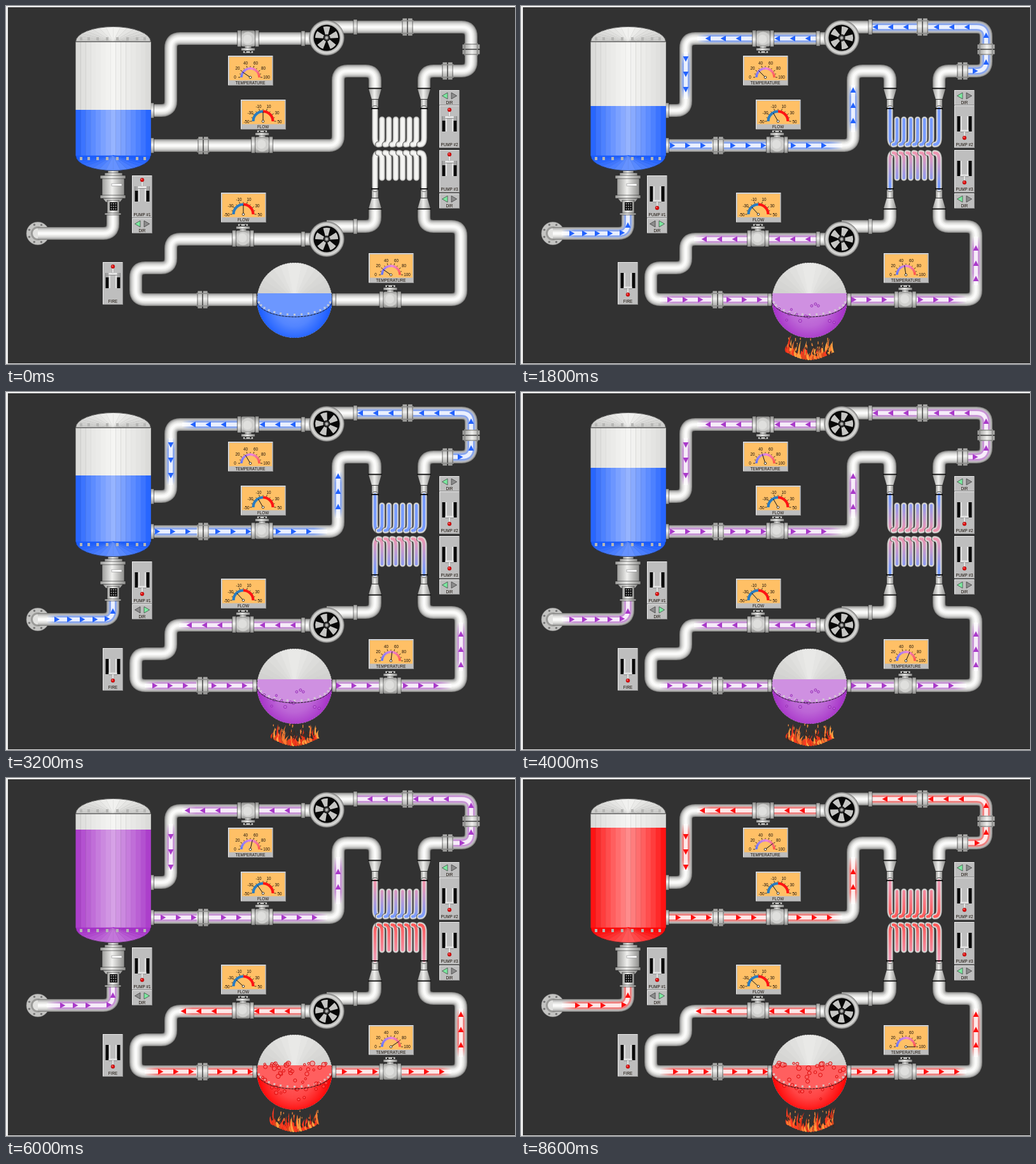
Animation, 800 px wide and 562 px high, one loop 8.8 s. Source, as an HTML page:

```html
<!DOCTYPE html>
<html lang="en">
<head>
<meta charset="utf-8">
<title>Heating loop</title>
<style>
html, body { margin: 0; width: 100%; height: 100%; overflow: hidden; background: #323232; }
svg { display: block; width: 100%; height: 100%; }
text { font: 6.3px "Liberation Sans", Arial, sans-serif; text-anchor: middle; fill: #181008; }
</style>
</head>
<body>
<svg id="stage" viewBox="0 0 800 562"></svg>
<script>
const LOOP = 8800, STEP = 200;
const BLUE = '#1a5cff', PURPLE = '#a632c8', RED = '#ff0505', PINK = '#ee7f9f';

// ---------- helpers ----------
const rgb = h => [1, 3, 5].map(i => parseInt(h.substr(i, 2), 16));
const mix = (a, b, k) => {
  const p = rgb(a), q = rgb(b);
  return '#' + p.map((v, i) => Math.round(v + (q[i] - v) * k).toString(16).padStart(2, '0')).join('');
};
const pale = (c, k) => mix(c, '#ffffff', k);
const times = (n, f) => Array.from({ length: n }, (_, i) => f(i)).join('');
const rect = (x, y, w, h, fill, more = '') =>
  `<rect x="${x}" y="${y}" width="${w}" height="${h}" fill="${fill}" ${more}/>`;
const disc = (x, y, r, fill, more = '') => `<circle cx="${x}" cy="${y}" r="${r}" fill="${fill}" ${more}/>`;
const line = (d, c, w, more = '') => `<path d="${d}" fill="none" stroke="${c}" stroke-width="${w}" ${more}/>`;
const shape = (d, fill, more = '') => `<path d="${d}" fill="${fill}" ${more}/>`;
const label = (x, y, s) => `<text x="${x}" y="${y}">${s}</text>`;
const EDGE = 'stroke="#222" stroke-width=".6"';
const FLIP = 'transform="translate(0 448) scale(1 -1)"';

function random(seed) {
  let s = seed * 7919 + 17;
  return () => (s = (s * 16807) % 2147483647) / 2147483647;
}
function track(keys, t) {
  let i = 1;
  while (i < keys.length - 1 && t > keys[i][0]) i++;
  const [a, u] = keys[i - 1], [b, v] = keys[i];
  return u + (v - u) * Math.max(0, Math.min(1, (t - a) / (b - a)));
}

// ---------- pipework ----------
// starts at (x, y), then runs alternately sideways and upright through the given stops
function route(x, y, ...stops) {
  const R = 15;
  let d = `M${x} ${y}`;
  stops.forEach((v, i) => {
    const flat = i % 2 === 0, from = flat ? x : y, dir = Math.sign(v - from);
    const next = stops[i + 1];
    if (next === undefined) {
      d += (flat ? 'H' : 'V') + v;
    } else {
      const turn = Math.sign(next - (flat ? y : x));
      const [cx, cy] = flat ? [v, y] : [x, v];
      d += (flat ? 'H' : 'V') + (v - dir * R) + `Q${cx} ${cy} ` +
        (flat ? `${cx} ${cy + turn * R}` : `${cx + turn * R} ${cy}`);
    }
    if (flat) x = v; else y = v;
  });
  return d;
}

const SHADES = [[1, '#858583'], [.9, '#a2a2a0'], [.8, '#bababa'], [.68, '#cececc'],
  [.54, '#e0e0de'], [.38, '#eeeeec'], [.2, '#fafaf9']];
const pipe = d => SHADES.map(([k, c]) => line(d, c, k * 20)).join('');

const PIPES = [
  route(50, 357, 168, 326),
  route(230, 164, 259, 51, 480),
  route(230, 219, 522, 102, 580, 130),
  route(504, 33, 731, 102, 657, 130),
  route(504, 366, 259, 411, 204, 461, 392),
  route(504, 346, 580, 318),
  route(515, 461, 715, 346, 657, 318)
];

// x1, y1, x2, y2, first arrow, fade (1 start, 2 end), gap, count
const UPPER = {
  runs: [
    [232, 219, 300, 219, 6, 0], [319, 219, 386, 219, 14, 0], [420, 219, 505, 219, 8, 2],
    [522, 198, 522, 124, 18, 3], [465, 51, 398, 51, 14, 0], [364, 51, 277, 51, 22, 2],
    [259, 72, 259, 146, 11, 3], [709, 33, 640, 33, 8, 0], [622, 33, 552, 33, 17, 0],
    [64, 357, 146, 357, 16, 1, 20, 4]
  ],
  bends: [route(709, 33, 731, 60), route(703, 102, 731, 76), route(146, 357, 168, 328)],
  marks: [[731, 46, -90], [731, 88, -90], [714, 102, 0], [159, 356, 0], [168, 344, -90]]
};
const LOWER = {
  runs: [
    [465, 366, 390, 366, 14, 0], [356, 366, 272, 366, 20, 2], [218, 461, 299, 461, 16, 1],
    [318, 461, 389, 461, 9, 0], [518, 461, 586, 461, 5, 0], [622, 461, 700, 461, 6, 2],
    [715, 438, 715, 362, 10, 3]
  ],
  bends: [], marks: []
};

const tint = (d, paint) => line(d, paint, 14, 'opacity=".18"') + line(d, paint, 11, 'opacity=".33"') +
  line(d, '#fff', 6, 'opacity=".8"');
const arrow = (x, y, a, c) =>
  `<path transform="translate(${x} ${y}) rotate(${a})" d="M-4-4.4L4.4 0L-4 4.4Z" fill="${c}"/>`;

function flow(loop, name, c, odd) {
  const ink = pale(c, .04);
  let s = loop.bends.map(d => tint(d, c)).join('');
  loop.runs.forEach(([x1, y1, x2, y2, first, fade, gap = 24, n = 3], i) => {
    const id = name + i, len = Math.hypot(x2 - x1, y2 - y1), a = Math.atan2(y2 - y1, x2 - x1);
    const stop = (o, k) => `<stop offset="${o}" stop-color="${c}" stop-opacity="${k}"/>`;
    s += `<linearGradient id="${id}" gradientUnits="userSpaceOnUse" x1="${x1}" y1="${y1}" x2="${x2}" y2="${y2}">` +
      stop(0, fade & 1 ? 0 : 1) + stop(.25, 1) + stop(.75, 1) + stop(1, fade & 2 ? 0 : 1) + '</linearGradient>';
    s += tint(`M${x1} ${y1}L${x2} ${y2}`, `url(#${id})`);
    s += times(n, k => {
      const p = first + k * gap + (odd ? 9 : 0);
      return p > len - 2 ? '' : arrow(x1 + p * Math.cos(a), y1 + p * Math.sin(a), a * 180 / Math.PI, ink);
    });
  });
  const go = odd ? 3 : 0;
  return s + loop.marks.map(([x, y, a]) => arrow(x + (a ? 0 : go), y - (a ? go : 0), a, ink)).join('');
}

// ---------- fittings ----------
const metal = (id, x2, y2) => `<linearGradient id="${id}" x2="${x2}" y2="${y2}">
  <stop stop-color="#9c9c9a"/><stop offset=".45" stop-color="#f0f0ee"/><stop offset="1" stop-color="#8e8e8c"/></linearGradient>`;
const MV = 'url(#mv)', MH = 'url(#mh)';

const flange = (x, y, turn = 0) => `<g transform="translate(${x} ${y}) rotate(${turn})">` +
  rect(-9, -11, 18, 22, MV) + rect(-8, -14, 7.5, 28, MV, EDGE) + rect(.5, -14, 7.5, 28, MV, EDGE) +
  rect(-10, -10.5, 20, 1.6, '#8a8a88') + rect(-10, 9, 20, 1.6, '#8a8a88') + '</g>';
const collar = (x, y, w = 6, h = 24) => rect(x, y - h / 2, w, h, MV, EDGE);

const valve = (x, y, side) => `<g transform="translate(${x} ${y}) scale(1 ${side})">` +
  rect(-5, -17, 10, 8, MH) + rect(-11, -12.5, 22, 25, MV, 'rx="3"') + disc(0, 0, 10.5, '#cfcfcd') +
  disc(-1, -1, 7, '#dfdfdd') + collar(-17, 0, 6, 26) + collar(11, 0, 6, 26) +
  rect(-11, -19, 22, 4, MH, EDGE) + rect(-8, -23, 16, 3.5, '#c8c8c6', EDGE) +
  rect(-5, -22, 2, 2, '#111') + rect(3, -22, 2, 2, '#111') + '</g>';

const reducer = x => shape(`M${x - 10} 130H${x + 10}L${x + 5} 147H${x - 5}Z`, MH) +
  rect(x - 5, 147, 10, 16, MH) + rect(x - 11, 128.5, 22, 1.8, '#0c0c0c') +
  rect(x - 6, 146, 12, 1, '#333') + rect(x - 6, 161, 12, 1.8, '#0c0c0c');

const casing = (x, y) => disc(x, y, 27.5, 'url(#ring)', 'stroke="#666" stroke-width=".6"') +
  disc(x, y, 20.5, '#080808');

function fan(x, y, turn) {
  const blade = shape('M-2-4L-5.5-17.2A18 18 0 0 1 5.5-17.2L2-4Z', '#c6c6c4');
  return `<g transform="translate(${x} ${y}) rotate(${turn})">` +
    times(5, i => `<g transform="rotate(${i * 72})">${blade}</g>`) +
    disc(0, 0, 5, '#3a3a3a', 'stroke="#000"') + disc(0, 0, 2.4, '#b0b0ae') + '</g>';
}

const feeder = rect(160, 258, 17, 5, MH, EDGE) + rect(155, 262, 28, 5, MH, EDGE) +
  rect(151, 270, 35, 29, MH, EDGE) + rect(148, 266, 40, 5, MH, EDGE) + rect(148, 297, 40, 5, MH, EDGE) +
  shape('M152 302H184L179 308H157Z', MH, EDGE) + rect(159, 305, 19, 21, MH, EDGE) +
  rect(163, 308, 12, 13, '#0a0a0a') + times(9, i => rect(164.5 + i % 3 * 3.5, 309.5 + (i / 3 | 0) * 4, 2, 2, '#999')) +
  rect(155, 325, 26, 3, MH, EDGE) + rect(166, 279, 16, 3.5, '#fff', 'stroke="#777" stroke-width=".5"');

const wallPlate = disc(50, 357, 18, '#c4c4c2', 'stroke="#777" stroke-width=".6"') +
  times(8, i => disc(50 + 14.5 * Math.cos(i * .785 + .4), 357 + 14.5 * Math.sin(i * .785 + .4), 1.7, '#777')) +
  disc(50, 357, 11, '#9a9a98') + disc(50, 357, 8, '#e2e2e0');

// ---------- vessels ----------
const across = (x, a, b) => mix(a, b, Math.pow(Math.max(0, 1 - Math.abs(x)), .8));
function dome(y, dir, a, b) {
  const n = 16, at = i => {
    const q = Math.PI * i / n;
    return `${168.5 - 59 * Math.cos(q)} ${y + dir * 23.5 * Math.sin(q)}`;
  };
  return times(n, i => {
    const c = across(Math.cos(Math.PI * (i + .5) / n), a, b);
    return shape(`M168.5 ${y}L${at(i)}L${at(i + 1)}Z`, c, `stroke="${c}" stroke-width=".5"`);
  }) + line(`M109.5 ${y}A59 23.5 0 0 ${dir < 0 ? 1 : 0} 227.5 ${y}`, '#222', .7);
}
const bands = (y, h, a, b) => times(15, i =>
  rect((109.5 + i * 118 / 15).toFixed(2), y, 8.2, h, across((i - 7) / 7.5, a, b)));
const rivets = y => [118, 130, 144, 159, 175, 191, 206, 218].map(x => rect(x - 2, y, 4, 5, '#b6b6b4')).join('');

function tank(c, level) {
  return dome(56, -1, '#cececc', '#f4f4f2') + bands(56, level - 56, '#d8d8d6', '#f5f5f3') +
    bands(level, 235 - level, c, pale(c, .54)) + dome(235, 1, c, pale(c, .36)) +
    line('M109.5 56H227.5', '#222', 1) + rivets(49) + rivets(237);
}

function boiler(c, variant, kind) {
  const seam = 'M394 461A59.5 27 0 0 0 513 461';
  let s = `<radialGradient id="deep" gradientUnits="userSpaceOnUse" cx="453" cy="472" r="56">
    <stop stop-color="${pale(c, .38)}"/><stop offset=".55" stop-color="${pale(c, .25)}"/><stop offset="1" stop-color="${c}"/></radialGradient>`;
  s += disc(453.5, 462, 59, '#e4e4e2') + '<g clip-path="url(#ball)">';
  s += times(16, i => {
    const a = Math.PI * i / 16, b = Math.PI * (i + 1) / 16, m = (a + b) / 2;
    const fill = across(Math.cos(m), '#d0d0ce', '#ebebe9');
    return shape(`M453.5 462L${453.5 - 64 * Math.cos(a)} ${462 - 64 * Math.sin(a)}L${453.5 - 64 * Math.cos(b)} ${462 - 64 * Math.sin(b)}Z`,
      fill, `stroke="${fill}" stroke-width=".6"`);
  });
  s += rect(390, 451, 130, 72, pale(c, kind === 1 ? .46 : .36)) + shape(seam + 'V525H394Z', 'url(#deep)');
  s += times(15, i => {
    const q = Math.PI * (i + 1) / 16;
    return rect(452 - 57 * Math.cos(q), 459 + 24 * Math.sin(q), 3, 3, '#d4d4d2', 'opacity=".85"');
  });
  if (kind) {
    const boil = kind === 2, r = random(kind * 5 + variant), ink = boil ? '#d80000' : '#8f22b2';
    s += times(!boil ? 18 : variant ? 36 : 52, () => {
      const x = 400 + r() * 107, depth = r(), y = boil ? 448 + depth * depth * 58 : 462 + depth * 46;
      const size = boil ? 1.5 + r() * 3 * (1 - depth * .6) : 1.6 + r() * .8;
      return Math.hypot(x - 453, y - 462) > 54 ? '' :
        disc(x, y, size, pale(c, .4), `fill-opacity=".45" stroke="${ink}" stroke-width=".9"`);
    });
  }
  return s + '</g>' + line(seam, '#111', 1, 'stroke-dasharray="4 1"') +
    disc(453.5, 462, 59, 'none', 'stroke="#333" stroke-width=".5" stroke-dasharray="2 2"') +
    collar(388, 461, 6, 20) + collar(512.5, 461, 6, 20);
}

function fire(seed) {
  const r = random(seed + 3), hot = ['#ff3a20', '#d8481e', '#ff7a30', '#ffa240', '#e83018'];
  const pick = () => hot[r() * 5 | 0];
  const tongue = (x, y, h, w, lean, c) => shape(
    `M${x - w} ${y}Q${x - w - 4} ${y - h * .45} ${x + lean} ${y - h}Q${x - w} ${y - h * .5} ${x + w} ${y}Z`, c);
  const base = i => 544 + 11 * Math.sin(Math.PI * i);
  let s = times(30, i => tongue(418 + i * 2.5, base(i / 29), 6 + r() * 24, .8 + r() * 1.2, r() * 8 - 3, pick()));
  s += times(18, i => tongue(420 + i * 4, base(i / 17) + 1, 5 + r() * 8, 1.4, r() * 4 - 2, pick()));
  s += times(16, () => tongue(418 + r() * 74, 534 + r() * 16, 4 + r() * 6, .9, r() * 4 - 2, '#3a2a24'));
  return s + times(18, () => rect(417 + r() * 74, 520 + r() * 18, 1.3, 2 + r() * 3, '#f08a3c'));
}

// ---------- heat exchanger ----------
function coil(id, colors) {
  const tubes = ['M580 161V207Q580 217.5 587 217.5'];
  for (let i = 0; i < 6; i++) {
    const x = 591 + i * 10.8;
    tubes.push(`M${x} 178V207Q${x} 217.5 ${x - 6} 217.5`);
  }
  tubes.push('M657 161V207Q657 217.5 650 217.5');
  const cap = 'stroke-linecap="round"';
  let s = '';
  if (colors) s += `<linearGradient id="${id}" gradientUnits="userSpaceOnUse" x1="0" y1="168" x2="0" y2="218">
    <stop stop-color="${colors[0]}"/><stop offset="1" stop-color="${colors[1]}"/></linearGradient>`;
  return s + tubes.map(d =>
    line(d, '#3c3c3c', 10.2, cap) + line(d, '#a4a4a2', 9.2, cap) + line(d, '#d8d8d6', 7.6, cap) +
    line(d, '#f5f5f3', 5, cap) + (colors ? line(d, `url(#${id})`, 4.6, cap + ' opacity=".8"') : '')
  ).join('') + rect(574, 160, 12, 1.8, '#0c0c0c') + rect(651, 160, 12, 1.8, '#0c0c0c');
}

// ---------- panels ----------
const plate = (x, y, w, h) => rect(x, y, w, h, '#8a8a8a') + rect(x, y, w - 1, h - 1, '#ececec') +
  rect(x + 1, y + 1, w - 2, h - 2, '#bebebe');
const polar = (r, v) => `${35 - r * Math.cos(Math.PI * v)} ${34 - r * Math.sin(Math.PI * v)}`;

function gauge(x, y, heat) {
  let s = plate(0, 0, 71, 47) + rect(2, 2, 67, 36.5, '#ffc066');
  const arc = (r, a, b) => `M${polar(r, a)}A${r} ${r} 0 0 1 ${polar(r, b)}`;
  if (heat) {
    s += times(10, i => line(arc(14, i / 10, (i + 1.05) / 10),
      i < 5 ? mix('#6678ff', '#ea84dc', i / 5) : mix('#ea84dc', '#ff5c50', (i - 5) / 4), 3.6));
  } else s += line(arc(15.5, 0, .5), '#2a7cc0', 4.2) + line(arc(15.5, .5, 1), '#ff1414', 4.2);
  const rim = heat ? 16 : 17.6;
  s += times(11, i => line(`M${polar(rim, i / 10)}L${polar(rim + (i % 2 ? 1.6 : 3), i / 10)}`, '#181008', .8));
  const marks = heat
    ? [['0', 11, 36], ['20', 15, 22], ['40', 27.5, 13.5], ['60', 43.5, 13.5], ['80', 55.5, 22], ['100', 60.5, 36]]
    : [['-50', 9, 37], ['-30', 15, 23], ['-10', 28, 13], ['10', 44, 13], ['30', 57, 23], ['50', 61, 37]];
  s += marks.map(([v, a, b]) => label(a, b, v)).join('') + label(35, 45, heat ? 'TEMPERATURE' : 'FLOW');
  return `<g transform="translate(${x} ${y})">${s}</g>`;
}
const needle = (x, y, v) => `<g transform="translate(${x} ${y})">` + line(`M35 34L${polar(15, v)}`, '#111', 1) +
  disc(35, 34, 1.8, '#fff', 'stroke="#111" stroke-width=".8"') + '</g>';

function lever(x, y, on) {
  const ball = on ? 51 : 7, bar = on ? 38.5 : 17;
  let s = rect(4.5, 17, 6.5, 24, '#0a0a0a') + rect(21, 17, 6.5, 24, '#0a0a0a');
  if (!on) s += rect(4.5, 17, 6.5, 7, '#a4a4a4') + rect(21, 17, 6.5, 7, '#a4a4a4');
  s += rect(9.5, 17, 2.4, 24, '#e4e4e4') + rect(20, 17, 2.4, 24, '#e4e4e4');
  s += rect(9.5, bar, 13, 3, '#e8e8e8') + rect(9.5, bar + 3, 13, .8, '#777');
  s += rect(14.5, on ? 41 : 9, 3, 8, '#e4e4e4', 'stroke="#888" stroke-width=".4"');
  s += disc(16, ball, 2.9, '#e01010', 'stroke="#800" stroke-width=".5"') + disc(15.2, ball - .9, .9, '#ff9a9a');
  return `<g transform="translate(${x} ${y})">${s}</g>`;
}
const dirs = (x, y, right) => `<g transform="translate(${x} ${y})">` +
  shape('M13 4V14L4.5 9Z', right ? '#8c8c8c' : '#7de8a0', EDGE) +
  shape('M19 4V14L27.5 9Z', right ? '#7de8a0' : '#8c8c8c', EDGE) + '</g>';

const LEVERS = [[198, 266, 'PUMP #1'], [681, 156, 'PUMP #2'], [681, 226, 'PUMP #3'], [152, 402, 'FIRE']];
const DIRS = [[198, 333], [681, 132], [681, 294]];
const GAUGES = [[349, 78, 1], [369, 147, 0], [338, 293, 0], [570, 388, 1]];

// ---------- scene ----------
const layer = id => `<g id="${id}"></g>`;
document.getElementById('stage').innerHTML = `<defs>${metal('mv', 0, 1)}${metal('mh', 1, 0)}
  <radialGradient id="ring"><stop offset=".74" stop-color="#a8a8a6"/><stop offset=".87" stop-color="#dededc"/><stop offset="1" stop-color="#8e8e8c"/></radialGradient>
  <clipPath id="ball"><circle cx="453.5" cy="462" r="59"/></clipPath></defs>` +
  rect(0, 0, 800, 562, '#323232') + rect(0, 0, 800, 2, '#f0f0f0') + rect(0, 0, 3, 562, '#f0f0f0') +
  rect(0, 561, 800, 1, '#e8e8e8') + wallPlate + PIPES.map(pipe).join('') + layer('flows') +
  flange(310, 219) + flange(309, 461) + flange(631, 33) + flange(694, 102) + flange(731, 68, 90) +
  collar(227.5, 164, 5) + collar(227.5, 219, 5) + collar(464, 51) + collar(464, 366) + collar(546, 33) + collar(546, 346) +
  valve(380.5, 51, -1) + valve(402.5, 218, 1) + valve(372.5, 365, 1) + valve(604, 461, 1) +
  casing(504, 50) + casing(504, 366) + layer('fans') +
  `<g>${reducer(580)}${reducer(657)}</g><g ${FLIP}>${reducer(580)}${reducer(657)}</g>` + layer('coils') +
  feeder + layer('vessels') + layer('flames') +
  GAUGES.map(g => gauge(...g)).join('') +
  LEVERS.map(([x, y, s]) => plate(x, y, 32, 67) + label(x + 16, y + 63.5, s)).join('') +
  DIRS.map(([x, y]) => plate(x, y, 32, 24) + label(x + 16, y + 21.5, 'DIR')).join('') + layer('controls');

const set = (id, s) => { document.getElementById(id).innerHTML = s; };
const LEVEL = [[1400, 163], [1800, 157], [3200, 131], [4000, 119], [6000, 81], [6200, 78]];
const TEMP1 = [[0, .19], [1800, .25], [3200, .33], [4000, .4], [6000, .57], [7400, .67], [8600, .79]];
const TEMP2 = [[0, .19], [200, .2], [1800, .45], [3200, .54], [4000, .63], [6000, .81], [7400, .95], [8600, 1]];

function draw(step) {
  const t = step * STEP, beat = Math.floor(t / 400), odd = beat % 2;
  const burning = t >= 200, lowOn = t >= 600, upOn = t >= 1400;
  const up = t < 3600 ? 0 : t < 8000 ? 1 : 2, low = t < 1000 ? 0 : t < 5000 ? 1 : 2;
  const fill = t < 5000 ? 0 : t < 8200 ? 1 : 2, hues = [BLUE, PURPLE, RED];

  set('flows', (upOn ? flow(UPPER, 'u', hues[up], odd) : '') + (lowOn ? flow(LOWER, 'l', hues[low], odd) : ''));
  set('fans', fan(504, 50, upOn ? step * 26 : 0) + fan(504, 366, lowOn ? step * 26 : 0));

  const cool = '#5a86ff', warm = '#ff3434';
  const pairs = [[cool, cool], [cool, PINK], [warm, PINK]];
  const pair = k => odd ? [...pairs[k]].reverse() : pairs[k];
  set('coils', coil('cu', upOn && pair(up)) + `<g ${FLIP}>${coil('cl', lowOn && pair(low))}</g>`);

  set('vessels', tank(hues[fill], track(LEVEL, t)) + boiler(hues[low], beat % 4 === 1 ? 1 : 0, low));
  set('flames', burning ? fire(step % 4) : '');

  const sway = odd ? -.015 : .015;
  const flow1 = track([[1200, .5], [1600, .32]], t) + (t > 1600 ? sway : 0);
  const flow2 = track([[400, .5], [1000, .25]], t) + (t > 1000 ? sway : 0);
  const values = [track(TEMP1, t), flow1, flow2, track(TEMP2, t)];
  const on = [upOn, upOn, lowOn, burning];
  set('controls', GAUGES.map(([x, y], i) => needle(x, y, values[i])).join('') +
    LEVERS.map(([x, y], i) => lever(x, y, on[i])).join('') +
    DIRS.map(([x, y], i) => dirs(x, y, i === 0 && upOn)).join(''));
}

let last = -1;
function tick() {
  const step = Math.floor(performance.now() % LOOP / STEP);
  if (step !== last) draw(last = step);
  requestAnimationFrame(tick);
}
tick();
</script>
</body>
</html>
```
